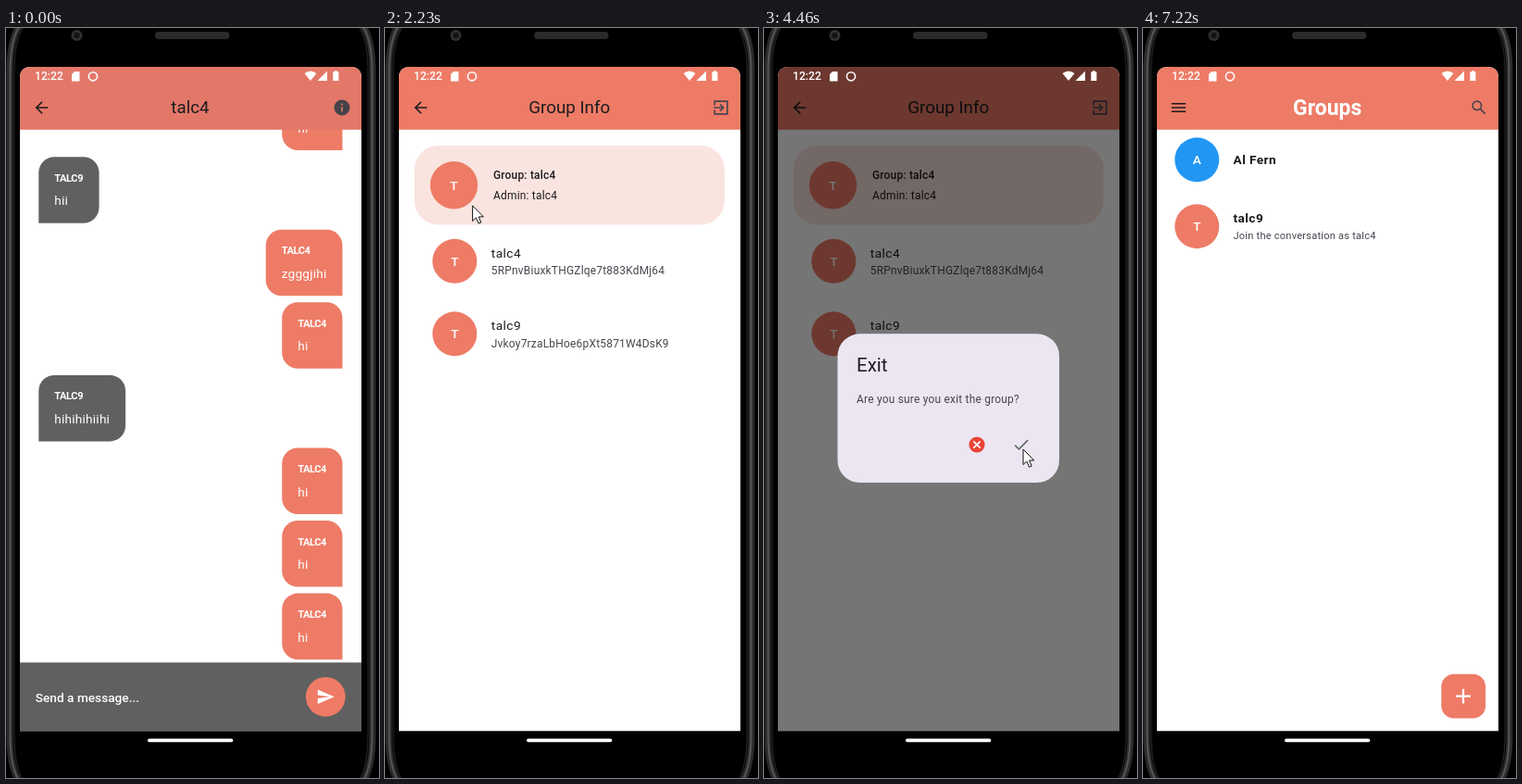
An HTML page for the animation above (7.69 s loop, 403 by 810 pixels).

```html
<!DOCTYPE html>
<html lang="en">
<head>
<meta charset="utf-8">
<title>Group chat</title>
<style>
html, body { margin: 0; width: 100%; height: 100%; overflow: hidden; background: #000; }
svg { display: block; width: 403px; height: 810px; font-family: Roboto, sans-serif; }
.title { font-size: 18.8px; fill: #1d1b1e; text-anchor: middle; }
.head { font-size: 23.06px; font-weight: 700; fill: #fff; text-anchor: middle; }
.exit { font-size: 20.5px; fill: #1d1b1e; }
.name { font-size: 13.67px; letter-spacing: .43px; fill: #1d1b1e; }
.body { font-size: 11.96px; letter-spacing: .21px; fill: #1d1b1e; }
.soft { fill: #49454f; }
.small { font-size: 11.1px; }
.bold { font-weight: 700; }
.medium { font-weight: 500; }
.label { font-size: 11.1px; font-weight: 700; letter-spacing: -.43px; fill: #fff; }
.msg { font-size: 13.67px; letter-spacing: .21px; fill: #fff; }
.hint { font-size: 13.67px; font-weight: 500; fill: #fff; }
.clock { font-size: 12.2px; font-weight: 500; fill: #fff; }
.initial { font-size: 13.67px; font-weight: 500; fill: #fff; text-anchor: middle; }
</style>
</head>
<body>
<svg viewBox="0 0 403 810">
  <defs>
    <clipPath id="screen"><path d="M15 759.5V54Q15 42 27 42H372Q384 42 384 54V759.5Z"/></clipPath>
    <clipPath id="page"><rect x="15" y="42" width="369" height="717.5"/></clipPath>
  </defs>
  <rect width="403" height="810" fill="#000"/>
  <g id="phone" fill="none"></g>
  <g clip-path="url(#screen)" id="stage">
    <g id="chat" clip-path="url(#page)"></g>
    <g id="info" clip-path="url(#page)"></g>
    <g id="dialog"></g>
    <rect id="scrim" x="15" y="42" width="369" height="717.5"/>
    <g id="groups" clip-path="url(#page)"></g>
  </g>
  <g id="status" fill="#fff"></g>
  <path id="cursor" d="M0 0V16.6L3.8 13L6.6 19.2L9.2 18.1L6.6 12H11.8Z" fill="#fff" stroke="#111"/>
</svg>
<script>
const LOOP = 7690, TICK = 68, PHASE = 46;
const OPEN = 1152, LEAVE = 5442, ZOOM = 300;
const CORAL = '#ee7b66', GREY = '#606060', DARK = '#1d1b1e', SOFT = '#49454f';
const ME = 'talc4', PEER = 'talc9';
const $ = id => document.getElementById(id);

// Line icons on a 24 unit grid
const ICONS = {
  back: 'M20 12H5M12.7 4.7L5.4 12l7.3 7.3',
  info: 'M12 11v6M12 7v2',
  exit: 'M4 9V4H20V20H4V15M3 12H15M10.8 7.7L15.1 12l-4.3 4.3',
  menu: 'M3 7H21M3 12H21M3 17H21',
  search: 'M15 9.5a5.5 5.5 0 1 1-11 0 5.5 5.5 0 1 1 11 0M13.8 13.8l6 6',
  cross: 'M7.7 7.7l8.6 8.6M16.3 7.7l-8.6 8.6',
  check: 'M4.1 12.7L9 17.6 20.3 6.3',
  plus: 'M12 5V19M5 12H19'
};
const icon = (name, x, y, color, size = .854) =>
  `<path d="${ICONS[name]}" fill="none" stroke="${color}" stroke-width="2" transform="translate(${x} ${y}) scale(${size}) translate(-12 -12)"/>`;
const rect = (x, y, w, h, fill, r = 0) =>
  `<rect x="${x}" y="${y}" width="${w}" height="${h}" rx="${r}" fill="${fill}"/>`;
const disc = (x, y, r, fill) => `<circle cx="${x}" cy="${y}" r="${r}" fill="${fill}"/>`;
const text = (cls, x, y, str) => `<text class="${cls}" x="${x}" y="${y}">${str}</text>`;
const avatar = (x, y, ch, fill = CORAL, r = 24) => disc(x, y, r, fill) + text('initial', x, y + 4.9, ch);
const ripple = (id, x, y) => `<circle id="${id}" cx="${x}" cy="${y}" r="17"/>`;
const page = (bar, lead) =>
  rect(15, 42, 369, 718, '#fff') + `<g class="list"></g>` + rect(15, 42, 369, 67.8, bar) + icon(lead, 38.5, 86, DARK);

function member(id, y, name, uid) {
  return `<g id="${id}">` + avatar(75.3, y, 'T') + text('name', 114.8, y - 4.2, name) +
    text('body soft', 114.8, y + 14.4, uid) + '</g>';
}

// Bubbles hug their text; the sender's lower corner stays square
function bubble(list, row, message) {
  const mine = message[0] !== '<', y = 60.6 + 78.57 * row, r = 17;
  const g = document.createElementNS('http://www.w3.org/2000/svg', 'g');
  list.append(g);
  g.innerHTML = text('label', 17, 26.5, (mine ? ME : PEER).toUpperCase()) +
    text('msg', 17, 52.2, message.replace('<', ''));
  const w = Math.max(31.3, g.lastChild.getComputedTextLength()) + 2 * r;
  const path = `<path d="M0 71.5V${r}a${r} ${r} 0 0 1 ${r} ${-r}H${w - r}a${r} ${r} 0 0 1 ${r} ${r}V${71.5 - r}a${r} ${r} 0 0 1 ${-r} ${r}Z"`;
  const flip = mine ? `transform="translate(${w}) scale(-1 1)"` : '';
  g.innerHTML = `${path} fill="${mine ? CORAL : GREY}" ${flip}/>` + g.innerHTML;
  g.setAttribute('transform', `translate(${mine ? 363.5 - w : 35.3} ${y})`);
}

// Phone body
const side = (x, w, c) => {
  const p = `<path d="M${x + 10} -2Q${x} 14 ${x} 46V765Q${x} 796 ${x + 9} 812" stroke="${c}" stroke-width="${w}"`;
  return `${p}/>${p} transform="translate(400) scale(-1 1)"/>`;
};
$('phone').innerHTML = side(4, 7, '#2b2b2b') + side(4.5, 2, '#555') + side(9, 1.2, '#242424') +
  disc(76.5, 8, 6, '#303030') + disc(76.5, 8, 3.2, '#141414') + rect(161, 4, 80.5, 8, '#2a2a2a', 4);

// Pages
$('chat').innerHTML = page('#e37869', 'back') + text('title', 199, 92.2, ME) +
  disc(363, 86, 8.5, '#46424a') + icon('info', 363, 86, '#e37869') + ripple('tapInfo', 363, 86) +
  rect(15, 685.3, 369, 75, GREY) + text('hint', 31.8, 728, 'Send a message...') +
  disc(345.3, 722.3, 21.4, CORAL) + '<path d="M336.8 730L354.7 722.3 336.8 714.6V720.6L349.6 722.3 336.8 724Z" fill="#fff"/>';
['hi', '<hii', 'zgggjihi', 'hi', '<hihihihiihi', 'hi', 'hi', 'hi']
  .forEach((m, row) => bubble($('chat').querySelector('.list'), row, m));

$('info').innerHTML = page(CORAL, 'back') + text('title', 199.2, 92.2, 'Group Info') +
  icon('exit', 363, 86, SOFT) + ripple('tapExit', 363, 86) +
  rect(31.8, 127, 335, 85.5, '#fae4df', 25.6) + avatar(74.5, 169.7, 'T', CORAL, 25.7) +
  text('body medium', 117, 163.3, 'Group: ' + ME) + text('body', 117, 185, 'Admin: ' + ME) +
  `<circle id="spinner" r="16.5" fill="none" stroke="${CORAL}" stroke-width="3.6" transform="translate(199.5 230) rotate(-90)"/>` +
  member('first', 251.8, ME, '5RPnvBiuxkTHGZlqe7t883KdMj64') +
  member('second', 330.3, PEER, 'Jvkoy7rzaLbHoe6pXt5871W4DsK9');

$('dialog').innerHTML = rect(15, 42, 369, 718, 'rgba(0,0,0,.54)') +
  rect(79.5, 330.3, 239.5, 160.7, '#ece6f2', 24) + text('exit', 100, 371.3, 'Exit') +
  text('body soft', 100, 405, 'Are you sure you exit the group?') +
  disc(230, 450, 8.6, '#ea4335') + icon('cross', 230, 450, '#fff') +
  icon('check', 278, 450, '#626a62') + ripple('tapCheck', 278, 450);

$('groups').innerHTML = page(CORAL, 'menu') + text('head', 199.2, 94.2, 'Groups') + icon('search', 363, 86, SOFT) +
  avatar(58.3, 142.3, 'A', '#2196f3') + text('name bold', 97.5, 147.2, 'Al Fern') +
  avatar(58.3, 214.2, 'T') + text('name bold', 97.5, 210.2, PEER) +
  text('body soft small', 97.5, 228.3, 'Join the conversation as ' + ME) +
  rect(322.3, 697.8, 47.8, 47.8, CORAL, 13.6) + icon('plus', 346, 721.7, '#fff', 1.13);

$('status').innerHTML = text('clock', 31, 56.4, '12:22') +
  '<path d="M74 47H79.5V57.5H71V50Z"/>' +
  '<circle cx="94" cy="52.3" r="4.6" fill="none" stroke="#fff" stroke-width="1.6"/>' +
  '<path d="M322.5 49Q329 44 335.5 49L329 57ZM347 46.5V57H336.5Z"/>' +
  rect(353.3, 47.4, 6.1, 9.6, '#fff') + rect(355, 46.2, 2.7, 2, '#fff') +
  rect(153, 767.6, 92.3, 3.6, '#fff', 1.8);

// Motion
const ramp = (t, a, b) => Math.max(0, Math.min(1, (t - a) / (b - a)));
const smooth = k => k * k * (3 - 2 * k);
// Quick start, long settling
const ease = x => x <= 0 ? 0 : x >= 1 ? 1 : 1 / (1 + (.2 / x) ** 3.44);
const snap = t => Math.max(0, Math.floor((t - PHASE) / TICK) * TICK + PHASE);

// Pointer stops: time, x, y
const STOPS = [[250, 396, 713], [660, 369, 89], [1270, 363, 81], [1610, 278, 137], [1900, 165, 208],
  [2370, 73, 187], [3000, 369, 82], [3960, 367, 81], [4400, 280, 455], [5560, 279, 457],
  [5900, 124, 185], [6460, 100, 161], [6640, 20, 215], [7200, 365, 812]];
function pointer(t) {
  const i = Math.max(1, STOPS.findIndex(p => p[0] >= t));
  const [t0, x0, y0] = STOPS[i - 1], [t1, x1, y1] = STOPS[i];
  const k = smooth(ramp(t, t0, t1));
  return `translate(${x0 + (x1 - x0) * k} ${y0 + (y1 - y0) * k})`;
}

const show = (id, on) => $(id).setAttribute('display', on ? 'inline' : 'none');
const fade = (id, v) => $(id).setAttribute('opacity', v);
const zoom = (id, s) => $(id).setAttribute('transform', `translate(199.5 400.5) scale(${s}) translate(-199.5 -400.5)`);
const tap = (id, t, at) => fade(id, .09 * ramp(t, at, at + 150) * (1 - ramp(t, at + 200, at + 450)));

function draw(now) {
  const t = snap(now);
  const open = ramp(t, OPEN, OPEN + ZOOM), leave = ramp(t, LEAVE, LEAVE + ZOOM);

  show('chat', open < 1);
  zoom('chat', 1 + .05 * ease(open));
  show('info', open > 0 && leave < 1);
  fade('info', ramp(open, .16, .26));
  zoom('info', leave > 0 ? 1 + .05 * ease(leave) : .85 + .15 * ease(open));
  show('groups', leave > 0);
  fade('groups', ramp(leave, .16, .26));
  zoom('groups', .85 + .15 * ease(leave));

  // The shade lies directly under the page that is arriving
  $('stage').insertBefore($('scrim'), leave > 0 ? $('groups') : $('info'));
  fade('scrim', .6 * ramp(leave || open, .2, .4));

  const loaded = t >= 1330, left = t >= 5250;
  show('spinner', !loaded);
  $('spinner').setAttribute('stroke-dasharray', `${Math.max(1, (t - 1235) * .11)} 200`);
  show('first', loaded && !left);
  show('second', loaded);
  $('second').setAttribute('transform', `translate(0 ${left ? -78.5 : 0})`);

  show('dialog', t >= 3600 && leave < 1);
  fade('dialog', ramp(t, 3600, 3750));
  tap('tapInfo', t, 950);
  tap('tapExit', t, 3400);
  tap('tapCheck', t, 4830);

  const seen = t >= 250 && t < 7200;
  show('cursor', seen);
  if (seen) $('cursor').setAttribute('transform', pointer(t));
}

const start = performance.now();
(function tick() {
  draw((performance.now() - start) % LOOP);
  requestAnimationFrame(tick);
})();
</script>
</body>
</html>
```
